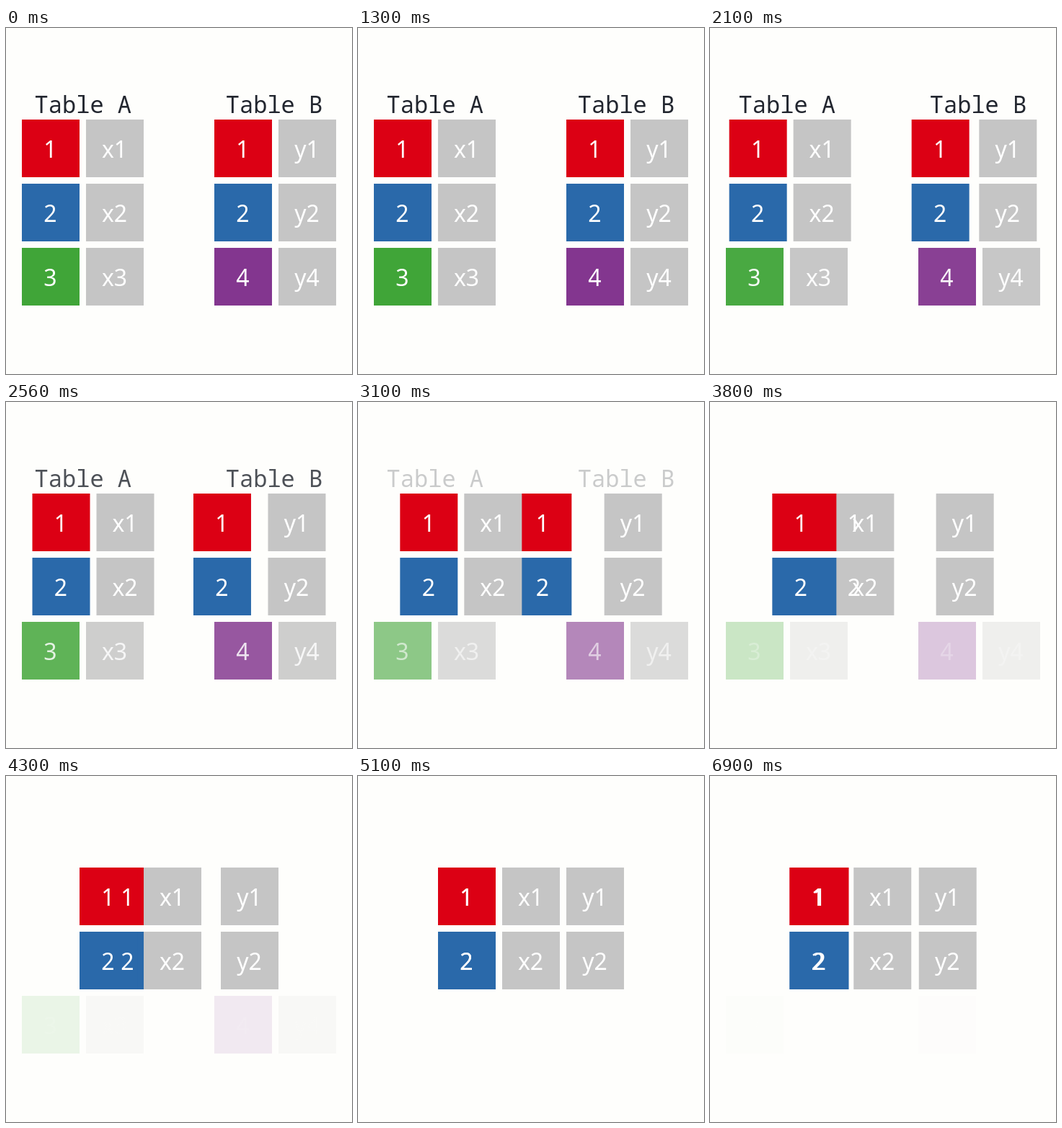
An HTML page for the animation above (6930 ms loop, 480 px wide and 480 px high).

```html
<!DOCTYPE html>
<html lang="en">
<head>
<meta charset="utf-8">
<title>Inner join</title>
<style>
  html, body { margin: 0; width: 100%; height: 100%; overflow: hidden; background: #fefefc; }
  svg { display: block; width: 100%; height: 100%; --p: 0; --title: 1; }
  text { text-anchor: middle; }
  .title { font: 32px "Noto Sans Mono", "DejaVu Sans Mono", monospace; fill: #22262f; opacity: var(--title); }
  .label { font: 32px "Noto Sans", "Open Sans", sans-serif; fill: #fff; }
  .move { transform: translateX(calc(var(--p) * var(--dx) * 1px)); }
  .fade { opacity: calc(1 - var(--p)); }
</style>
</head>
<body>
<svg viewBox="0 0 480 480">
  <g id="boxes"></g>
  <g id="labels"></g>
  <text class="title" x="106.8" y="118">Table A</text>
  <text class="title" x="372" y="118">Table B</text>
</svg>
<script>
const LOOP = 6930, FRAME = 100, STEPS = 34;
const JOIN_FRAME = 16, SPLIT_FRAME = 67;
const FADE_START = 2333, FADE_TIME = 1000, FADE_TICK = 1000 / 30;
const SIZE = 80, PITCH = 89, TOP = 127;
const COLORS = { 1: '#dc0014', 2: '#2a69aa', 3: '#40a538', 4: '#83368f' };
const GREY = '#c5c5c5';

const svg = document.querySelector('svg');
const boxes = document.getElementById('boxes');
const labels = document.getElementById('labels');

function add(parent, tag, attrs) {
  const el = document.createElementNS('http://www.w3.org/2000/svg', tag);
  for (const name in attrs) el.setAttribute(name, attrs[name]);
  return parent.appendChild(el);
}

// A column of three cells; matched rows move by dx, the last one fades out.
function addColumn(x, dx, prefix, keys) {
  keys.forEach((key, row) => {
    const y = TOP + row * PITCH;
    const kind = row < 2 ? 'move' : 'fade';
    const style = `--dx: ${dx}`;
    const fill = prefix ? GREY : COLORS[key];
    add(boxes, 'rect', { class: kind, style, x, y, width: SIZE, height: SIZE, fill });
    add(labels, 'text', { class: 'label ' + kind, style, x: x + 39.5, y: y + 52.5 })
      .textContent = prefix + key;
  });
}

// Back to front: the keys of B slide beneath the values of A.
addColumn(289, -2 * PITCH, '', [1, 2, 4]);
addColumn(22, PITCH, '', [1, 2, 3]);
addColumn(111, PITCH, 'x', [1, 2, 3]);
addColumn(378, -PITCH, 'y', [1, 2, 4]);

const clamp = v => Math.min(1, Math.max(0, v));
const sine = v => (1 - Math.cos(Math.PI * clamp(v))) / 2;

function draw(now) {
  const t = now % LOOP;
  const frame = Math.floor(t / FRAME);
  const p = sine((frame - JOIN_FRAME) / STEPS) - sine((frame - SPLIT_FRAME) / STEPS);
  const tick = Math.floor(t / FADE_TICK + 0.01) * FADE_TICK;
  svg.style.setProperty('--p', p.toFixed(5));
  svg.style.setProperty('--title', (1 - clamp((tick - FADE_START) / FADE_TIME)).toFixed(4));
}

function loop() {
  draw(performance.now());
  requestAnimationFrame(loop);
}
loop();
</script>
</body>
</html>
```
